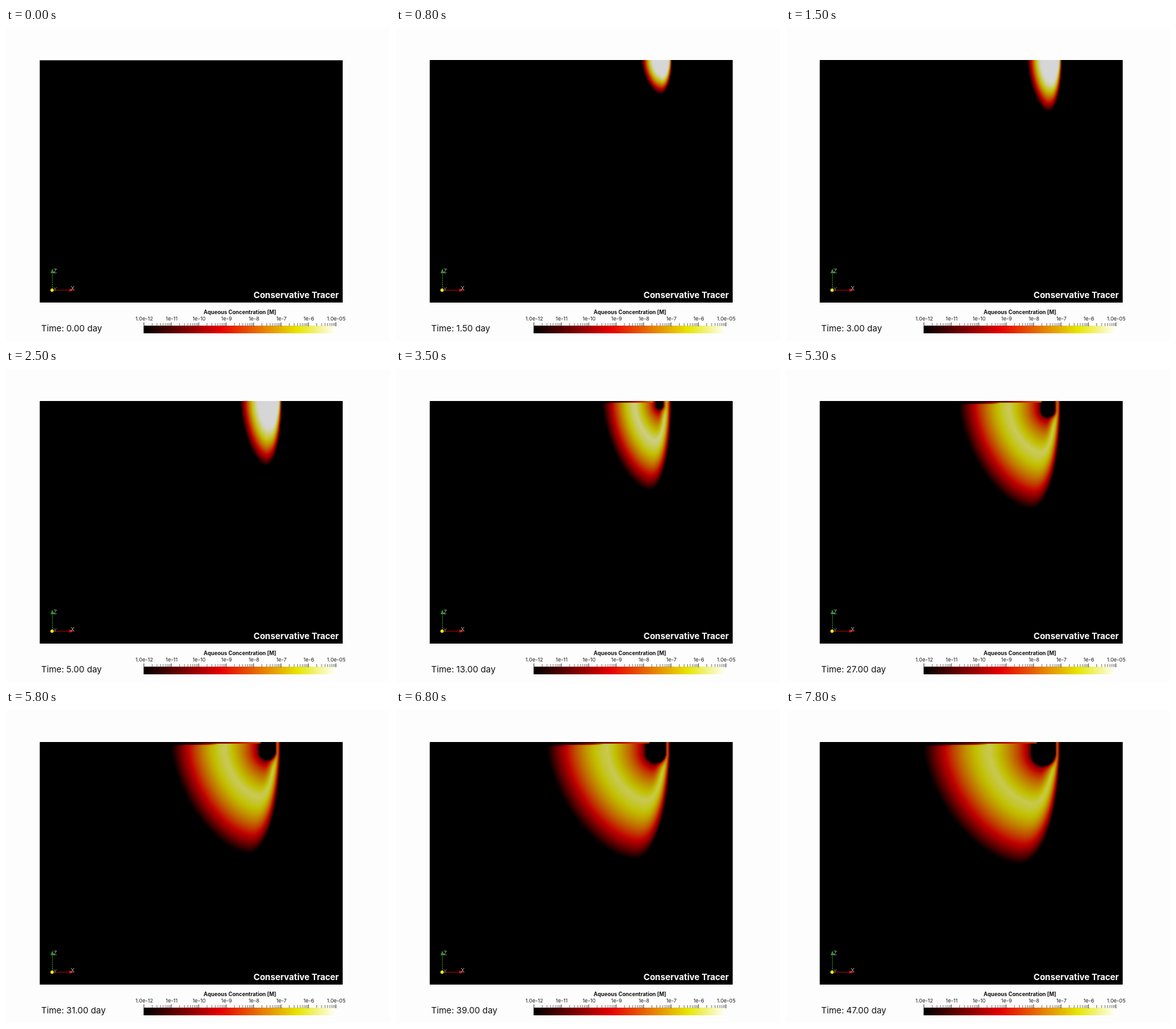
An HTML page with a canvas for the animation above (8000 ms loop, 600 px wide and 489 px high).

```html
<!DOCTYPE html>
<html lang="en">
<head>
<meta charset="utf-8">
<title>Conservative Tracer</title>
<style>
  html, body { margin: 0; width: 100%; height: 100%; overflow: hidden; background: #fefdfe; }
  canvas { display: block; }
</style>
</head>
<body>
<canvas id="stage" width="600" height="489"></canvas>
<script>
const ctx = document.getElementById('stage').getContext('2d');
const LOOP = 8000;
const BOX = { x: 52.7, y: 50.4, w: 473.4, h: 378.5 };
const COLS = 236, ROWS = 190;
const SHADE = 0.84;

const grid = document.createElement('canvas');
grid.width = COLS;
grid.height = ROWS;
const gridCtx = grid.getContext('2d');

const clamp = (v, lo = 0, hi = 1) => Math.min(hi, Math.max(lo, v));
const mix = (a, b, t) => a + (b - a) * t;

// Black-body ramp: black, red, yellow, white.
function heat(v) {
  v = clamp(v);
  const white = clamp((v - 0.8) / 0.2);
  return [
    mix(0.9 * clamp(v / 0.4), 1, white),
    mix(0.9 * clamp((v - 0.4) / 0.4), 1, white),
    white
  ].map(c => Math.round(c * 255));
}

// Half-day steps while injecting, then two-day steps.
function dayAt(ms) {
  const step = 2 * Math.floor(ms / 500) + (ms % 500 >= 300 ? 1 : 0);
  return step <= 10 ? step / 2 : 5 + 2 * (step - 10);
}

function plumeAt(day) {
  const flushed = Math.max(0, day - 5);
  return {
    right: 431 - 3 * clamp(day / 40),
    left: 430 - Math.max(26.8 * day ** 0.543, 40 + 4.3 * Math.min(day, 5)),
    tipX: 406.5 - 0.9 * day + 10 * Math.exp(-day / 5),
    depth: Math.max(139 + 39.8 * Math.log(day / 13), 38 * Math.min(day, 2) ** 0.6),
    holeX: 412 - 0.0057 * flushed ** 2,
    holeY: 50 + 21 * (1 - Math.exp(-flushed / 20)),
    holeR: flushed ? 3 + 0.38 * flushed : 0,
    hollow: clamp(flushed / 8),
    peak: flushed ? 0.87 + 0.11 * Math.exp(-flushed / 10) : 1,
    skin: 7 * (1 - Math.exp(-day / 17))
  };
}

function inside(p, x, y) {
  const dy = Math.max(0, y - BOX.y) / p.depth;
  const onLeft = x < p.tipX;
  const dx = onLeft ? (p.tipX - x) / (p.tipX - p.left) : (x - p.tipX) / (p.right - p.tipX);
  const power = onLeft ? 1.65 : 2.1;
  return dx ** power + dy ** power < 1;
}

// Distance from the hole's centre to the plume's rim along a direction.
function rimDistance(p, cx, cy) {
  let lo = 0, hi = 300;
  for (let i = 0; i < 12; i++) {
    const mid = (lo + hi) / 2;
    if (inside(p, p.holeX + cx * mid, p.holeY + cy * mid)) lo = mid;
    else hi = mid;
  }
  return lo;
}

function bodyValue(p, x, y) {
  const dx = x - p.holeX, dy = Math.max(0, y - p.holeY);
  const r = Math.hypot(dx, dy) || 0.01;
  const rim = rimDistance(p, dx / r, dy / r);
  if (r >= rim) return 0;

  const width = Math.max(2, rim - p.holeR);
  const u = (rim - r) / width;
  const steep = 1 + 1.5 * Math.max(0, dx / r) * (1 - p.hollow);
  const outer = 1 - (1 - clamp(u * steep / 0.62)) ** 1.6;
  const inner = clamp((1 - u) / 0.38) ** 0.42;
  const thin = 1 - Math.exp(-(width + 4) / 9);
  return p.peak * mix(1, thin, p.hollow) * Math.min(outer, mix(1, inner, p.hollow));
}

// The body, cut by a dark wedge that thins along the top edge.
function concentration(p, x, y) {
  const body = bodyValue(p, x, y);
  const along = (x - p.left) / (p.holeX - 10 - p.left);
  if (!p.hollow || along >= 1) return body;
  const wedge = Math.max(1.5, p.skin * (p.holeX - x) / (p.holeX - p.left));
  const below = clamp((y - BOX.y) / wedge) ** 4;
  return mix(0.65 * along ** 2, body, below);
}

function drawPlume(day) {
  ctx.fillStyle = '#000';
  ctx.fillRect(BOX.x, BOX.y, BOX.w, BOX.h);
  if (!day) return;
  const p = plumeAt(day);
  const image = gridCtx.createImageData(COLS, ROWS);
  for (let row = 0; row < ROWS; row++) {
    const y = BOX.y + (row + 0.5) * BOX.h / ROWS;
    for (let col = 0; col < COLS; col++) {
      const x = BOX.x + (col + 0.5) * BOX.w / COLS;
      const live = x > p.left && x < p.right && y < BOX.y + p.depth;
      const rgb = live ? heat(concentration(p, x, y)) : [0, 0, 0];
      image.data.set([...rgb.map(c => c * SHADE), 255], 4 * (row * COLS + col));
    }
  }
  gridCtx.putImageData(image, 0, 0);
  ctx.drawImage(grid, BOX.x, BOX.y, BOX.w, BOX.h);
}

function text(str, x, y, font, color = '#111', align = 'left') {
  ctx.font = font + ' Inter, sans-serif';
  ctx.fillStyle = color;
  ctx.textAlign = align;
  ctx.fillText(str, x, y);
}

function line(x1, y1, x2, y2, color, dash = []) {
  ctx.strokeStyle = color;
  ctx.lineWidth = 1;
  ctx.setLineDash(dash);
  ctx.beginPath();
  ctx.moveTo(x1, y1);
  ctx.lineTo(x2, y2);
  ctx.stroke();
  ctx.setLineDash([]);
}

function triangle(points, color) {
  ctx.fillStyle = color;
  ctx.beginPath();
  points.forEach(([x, y]) => ctx.lineTo(x, y));
  ctx.fill();
}

function drawAxes() {
  line(72.5, 408, 72.5, 383, '#2a9a20', [2, 1]);
  triangle([[69.5, 383], [72.5, 376], [75.5, 383]], '#2a9a20');
  line(74, 409.5, 100, 409.5, '#a00808');
  triangle([[99, 407], [106, 409.5], [99, 412]], '#e01010');
  text('Z', 74, 383, '9px', '#aaa');
  text('X', 101, 410, '9px', '#aaa');
  text('Y', 74, 411, '8px', '#888');
  ctx.fillStyle = '#f2ea10';
  ctx.beginPath();
  ctx.arc(72, 409.5, 2.6, 0, 2 * Math.PI);
  ctx.fill();
}

function drawLegend() {
  const x0 = 215.5, width = 300, decade = width / 7;
  text('Aqueous Concentration [M]', 365.5, 446.5, 'bold 8.4px', '#111', 'center');
  for (let x = 0; x < width; x++) {
    ctx.fillStyle = `rgb(${heat(x / width)})`;
    ctx.fillRect(215 + x, 465, 1, 12);
  }
  for (let i = 0; i <= 7; i++) {
    const x = x0 + i * decade;
    const label = (i % 7 ? '1e-' : '1.0e-') + (i === 7 ? '05' : 12 - i);
    text(label, x + 0.5, 457, '8.2px', '#222', 'center');
    line(x, 460, x, 466, '#444');
    for (let k = 2; k < 10 && i < 7; k++) {
      const minor = x + Math.log10(k) * decade;
      line(minor, 461, minor, 465.5, '#777');
    }
  }
}

function draw(day) {
  ctx.fillStyle = '#fefdfe';
  ctx.fillRect(0, 0, 600, 489);
  drawPlume(day);
  drawAxes();
  text('Conservative Tracer', 520, 421.5, 'bold 13.4px', '#fff', 'right');
  drawLegend();
  text(`Time: ${day.toFixed(2)} day`, 55, 473.5, '13.5px');
}

let shown = -1;
const start = performance.now();
function tick() {
  const day = dayAt((performance.now() - start) % LOOP);
  if (day !== shown) {
    draw(day);
    shown = day;
  }
  requestAnimationFrame(tick);
}
tick();
</script>
</body>
</html>
```
